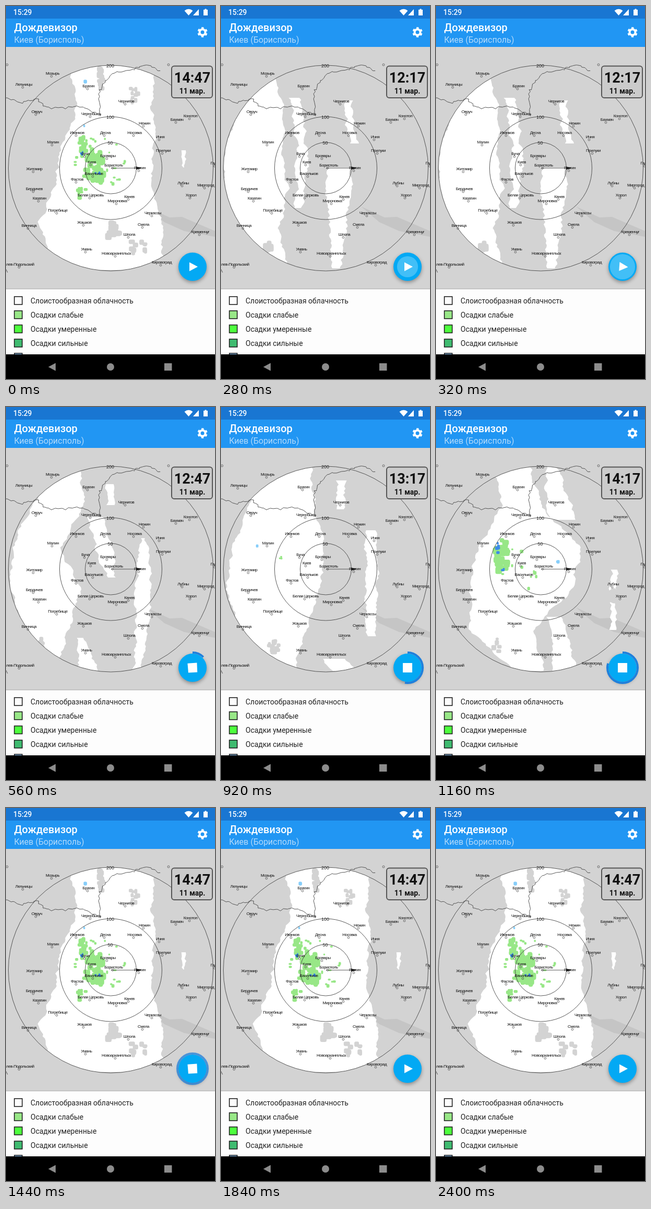
Write an HTML page with a canvas that moves like this. It is 400 px wide and 711 px high and loops after 2800 ms.

```html
<!DOCTYPE html>
<html lang="ru">
<head>
<meta charset="utf-8">
<style>
html, body { margin: 0; width: 100%; height: 100%; overflow: hidden; background: #000; }
canvas { display: block; }
</style>
</head>
<body>
<canvas id="stage" width="400" height="711"></canvas>
<script>
const ctx = document.getElementById('stage').getContext('2d');
const TAU = Math.PI * 2, LOOP = 2800;
const CX = 200.5, CY = 309, RADIUS = 196;
const FIRST_SCAN = 260, SCAN_TIME = 224;
const LAND = '#d3d3d3', RAIN = '#98e787', STORM = '#3c8be8', HAIL = '#87cefa';

const CITIES = `Мозырь 89 128|Лельчицы 34 149|Брагин 158 152|Чернигов 230 181|Овруч 59 201
Чернобыль 163 205|Нежин 265 223|Бахмач 327 216|Конотоп 353 209|Иванков 136 241|Десна 190 241
Носовка 246 241|Ичня 295 249|Малин 90 259|Буча 152 281|Бровары 195 285|Прилуки 301 275
Киев 164 297|Борисполь 206 303|Яготин 256 308|Житомир 54 310|Васильков 168 319|Фастов 136 330
Бердичев 54 348|Казатин 64 366|Белая_Церковь 162 360|Канев 236 363|Мироновка 213 371|Лубны 339 337
Миргород 382 341|Хорол 354 360|Погребище 99 389|Черкассы 281 394|Винница 44 418|Жашков 150 412
Смела 263 416|Шпола 236 435|Кременчуг 372 430|Умань 154 463|Новоархангельск 211 471
Кировоград 298 488|Гадяч 401 299|лев-Подольский 27 492`.split(/[|\n]/).map(row => row.split(' '));

// Cloud bands: top, bottom, then left and right edge at evenly spaced heights.
// Spots: colour, centre, spread, count, largest size.
const SCANS = [
  { bands: [
      [112, 503, [62, 38, 8, 6, 32, 104], [92, 122, 120, 128, 112, 132]],
      [175, 385, [132, 146, 145], [150, 168, 156]],
      [308, 500, [205, 204, 212], [250, 241, 228]],
      [180, 262, [239, 243], [250, 262]]],
    spots: [[LAND, 88, 470, 8, 26, 14, 14]] },
  { bands: [
      [112, 503, [115, 46, 12, 8, 36, 86], [140, 148, 105, 145, 118, 98]],
      [210, 325, [155, 170, 195], [187, 203, 209]],
      [440, 503, [135, 138], [148, 176]],
      [250, 500, [258, 248, 245], [268, 280, 258]],
      [147, 187, [193, 195], [206, 212]]],
    spots: [[LAND, 68, 465, 6, 24, 12, 12]] },
  { bands: [
      [112, 503, [85, 52, 20, 8, 36, 115], [172, 178, 200, 190, 166, 142]],
      [235, 437, [275, 277, 280], [296, 299, 296]],
      [140, 195, [222, 224], [240, 232]],
      [480, 503, [198, 212], [238, 258]]],
    spots: [[LAND, 102, 453, 10, 16, 14, 12], [HAIL, 70, 266, 2, 2, 2, 6], [RAIN, 114, 288, 2, 4, 4, 4]] },
  null,
  { bands: [
      [112, 503, [112, 125, 78, 66, 64, 150], [180, 200, 280, 260, 185, 203]],
      [112, 215, [210, 215], [230, 268]],
      [400, 503, [214, 226], [240, 270]],
      [310, 425, [335, 334], [348, 342]]],
    spots: [[LAND, 340, 360, 5, 12, 16, 14], [LAND, 115, 455, 10, 14, 6, 10],
      [RAIN, 126, 285, 13, 32, 34, 14], [RAIN, 165, 305, 42, 45, 12, 7],
      [STORM, 118, 267, 2, 12, 5, 7], [STORM, 130, 310, 4, 3, 3, 6], [HAIL, 234, 295, 1, 1, 3, 7]] },
  { bands: [
      [112, 503, [120, 138, 106, 92, 62, 105], [284, 278, 285, 279, 300, 303]],
      [275, 308, [337, 338], [344, 346]]],
    spots: [[LAND, 181, 136, 4, 24, 18, 12], [LAND, 246, 165, 8, 24, 10, 10],
      [LAND, 205, 430, 11, 20, 16, 14], [LAND, 250, 460, 22, 12, 12, 12],
      [RAIN, 148, 268, 6, 22, 16, 12], [RAIN, 172, 306, 20, 32, 34, 16],
      [RAIN, 146, 356, 10, 14, 9, 9], [RAIN, 185, 295, 58, 54, 26, 7],
      [STORM, 145, 281, 2, 4, 3, 5], [STORM, 175, 319, 7, 2, 4, 5],
      [HAIL, 152, 144, 1, 1, 3, 8], [HAIL, 150, 228, 1, 1, 2, 6]] }
];
// The 13:47 picture is the following one, slightly further west.
SCANS[3] = { ...SCANS[4], shift: -14 };

function seeded(seed) {
  return () => (seed = seed * 16807 % 2147483647) / 2147483647;
}
function along(values, u) {
  const pos = u * (values.length - 1), i = Math.min(values.length - 2, Math.floor(pos));
  return values[i] + (values[i + 1] - values[i]) * (pos - i);
}

// Adds a band whose edges wander like the ragged outline of radar echoes.
function addBand(path, [top, bottom, left, right], random) {
  const steps = Math.round((bottom - top) / 4);
  const edge = values => {
    let drift = 0;
    return Array.from({ length: steps + 1 }, (_, i) => {
      drift = drift * .7 + (random() - .5) * 6;
      return [along(values, i / steps) + drift, top + (bottom - top) * i / steps];
    });
  };
  const outline = [...edge(left), ...edge(right).reverse()];
  outline.forEach(([x, y], i) => i ? path.lineTo(x, y) : path.moveTo(x, y));
  path.closePath();
}
function spotPath([, x, y, rx, ry, count, size], random) {
  const path = new Path2D();
  while (count--) {
    const angle = random() * TAU, reach = Math.sqrt(random());
    const w = size * (.5 + random() / 2), h = size * (.5 + random() / 2);
    path.roundRect(x + rx * reach * Math.cos(angle) - w / 2, y + ry * reach * Math.sin(angle) - h / 2, w, h, size / 4);
  }
  return path;
}
SCANS.forEach((scan, i) => {
  const random = seeded(9973 * (i + 7)), clouds = new Path2D();
  scan.bands.forEach(band => addBand(clouds, band, random));
  scan.layers = [['#fff', clouds], ...scan.spots.map(spot => [spot[0], spotPath(spot, random)])];
});

// A border through a few key points, roughened between them.
function borderPath(points, random) {
  const path = new Path2D();
  path.moveTo(...points[0]);
  const xs = points.map(p => p[0]), ys = points.map(p => p[1]), steps = points.length * 6;
  for (let i = 1; i <= steps; i++) {
    path.lineTo(along(xs, i / steps) + (random() - .5) * 4, along(ys, i / steps) + (random() - .5) * 4);
  }
  return path;
}
const BORDERS = [
  [[0, 175], [30, 184], [59, 176], [77, 194], [110, 195], [146, 191], [181, 210]],
  [[181, 210], [178, 166], [185, 150], [206, 127], [243, 122], [268, 111], [295, 124]]
].map((points, i) => borderPath(points, seeded(5003 * (i + 3))));

function rect(x, y, w, h, fill) { ctx.fillStyle = fill; ctx.fillRect(x, y, w, h); }
function circle(x, y, r) { ctx.beginPath(); ctx.arc(x, y, r, 0, TAU); }
function text(str, x, y, font, fill, align = 'left') {
  ctx.font = font; ctx.fillStyle = fill; ctx.textAlign = align;
  ctx.fillText(str, x, y);
}
function fillPath(d, fill) { ctx.fillStyle = fill; ctx.fill(new Path2D(d)); }
const ramp = (t, a, b) => Math.min(1, Math.max(0, (t - a) / (b - a)));
const smooth = u => u * u * (3 - 2 * u);

function drawMap(index) {
  const scan = SCANS[index];
  rect(0, 78, 400, 463, LAND);
  fillPath('M268 382L313 403L337 402L400 429V440L341 429L303 412Z', '#c5c5c5');
  ctx.save();
  circle(CX, CY, RADIUS); ctx.clip();
  ctx.translate(scan.shift || 0, 0);
  for (const [fill, path] of scan.layers) { ctx.fillStyle = fill; ctx.fill(path); }
  ctx.restore();

  ctx.strokeStyle = '#444'; ctx.lineWidth = .9;
  BORDERS.forEach(path => ctx.stroke(path));
  ctx.stroke(new Path2D('M0 502L3 508M201 309H258'));
  for (const r of [RADIUS / 4, RADIUS / 2, RADIUS]) { circle(CX, CY, r); ctx.stroke(); }
  fillPath('M260 309L249 306V312Z', '#222');
  ctx.lineWidth = .7;
  for (const x of [2, 311]) { circle(x, 112, 2); ctx.stroke(); }
  ctx.letterSpacing = '-0.5px';
  for (const [name, x, y] of CITIES) {
    circle(x - 2, +y + 6, 1.9); ctx.stroke();
    text(name.replace('_', ' '), +x, +y + 3, '8px "Liberation Sans", Arial, sans-serif', '#111', 'center');
  }
  ctx.letterSpacing = '0px';
  for (const km of [50, 100, 200]) {
    text(km, 199.5, CY + 4 - km * RADIUS / 200, '9px "Liberation Sans", Arial, sans-serif', '#222', 'center');
  }

  ctx.beginPath(); ctx.roundRect(317, 114.5, 78, 60.5, 5);
  ctx.fillStyle = '#cbcbcb'; ctx.fill();
  ctx.strokeStyle = '#555'; ctx.lineWidth = 2; ctx.stroke();
  const minutes = 12 * 60 + 17 + index * 30;
  text(`${Math.floor(minutes / 60)}:${minutes % 60}`, 356.5, 146, 'bold 27px Roboto, sans-serif', '#111', 'center');
  text('11 мар.', 356.5, 167, 'bold 14px Roboto, sans-serif', '#111', 'center');
}

function drawHeader() {
  rect(0, 0, 400, 24, '#1976d2');
  rect(0, 24, 400, 54, '#2196f3');
  text('15:29', 14, 17, '500 14px Roboto, sans-serif', '#fff');
  text('Дождевизор', 15.5, 48, '500 20px Roboto, sans-serif', '#fff');
  text('Киев (Борисполь)', 15.5, 70, '16px Roboto, sans-serif', '#b3dafb');
  fillPath('M341.5 9Q349.5 2.5 357.5 9L349.5 18Z', '#fff');
  fillPath('M369 6V18H358Z', '#fff');
  fillPath('M378 7H380.5V5.5H383.5V7H386V18H378Z', '#fff');
  ctx.strokeStyle = '#fff';
  circle(376, 50, 5.5); ctx.lineWidth = 4; ctx.stroke();
  // Six gear teeth, one of them pointing up.
  const tooth = TAU * 8 / 12;
  ctx.setLineDash([tooth, tooth]); ctx.lineDashOffset = -tooth / 2;
  circle(376, 50, 8); ctx.lineWidth = 3.4; ctx.stroke();
  ctx.setLineDash([]);
}

function drawLegend() {
  rect(0, 538.5, 400, 2, '#bdbdbd');
  rect(0, 540, 400, 124, '#fdfdfd');
  [['#fdfdfd', 'Слоистообразная облачность'], [RAIN, 'Осадки слабые'], ['#4dff3d', 'Осадки умеренные'],
   ['#3fbb70', 'Осадки сильные'], ['#87bdf0', '']].forEach(([fill, label], i) => {
    const y = 554 + i * 27;
    rect(16, y, 15, 15, fill);
    ctx.strokeStyle = '#222'; ctx.lineWidth = 1.6; ctx.strokeRect(16, y, 15, 15);
    text(label, 47, y + 13, '14px Roboto, sans-serif', '#222');
  });
  rect(0, 664, 400, 47, '#000');
  fillPath('M81 688L95 680.5V695.5Z', '#8c8c8c');
  circle(200, 688, 7); ctx.fill();
  rect(303, 681, 14.5, 14, '#8c8c8c');
}

function drawButton(t) {
  ctx.save();
  ctx.translate(357, 497);
  ctx.save();
  ctx.shadowColor = 'rgba(0,0,0,.35)'; ctx.shadowBlur = 7; ctx.shadowOffsetY = 3;
  circle(0, 0, 27); ctx.fillStyle = '#03a9f4'; ctx.fill();
  ctx.restore();

  // The ring gains a quarter turn with each new scan.
  const sweep = TAU * ramp(t, 448, 448 + 4 * SCAN_TIME);
  ctx.globalAlpha = 1 - ramp(t, 1400, 1560);
  ctx.beginPath(); ctx.arc(0, 0, 29, -TAU / 4, sweep - TAU / 4);
  ctx.strokeStyle = '#1f80dc'; ctx.lineWidth = 4;
  if (sweep) ctx.stroke();

  ctx.globalAlpha = .25 * ramp(t, 80, 160) * (1 - ramp(t, 400, 560));
  circle(0, 0, 26 * ramp(t, 80, 340)); ctx.fillStyle = '#fff'; ctx.fill();

  ctx.globalAlpha = 1;
  const stop = smooth(ramp(t, 280, 600)) - smooth(ramp(t, 1400, 1740));
  const play = [[-6, -8.5], [10, 0], [10, 0], [-6, 8.5]];
  const square = [[-9, -9], [9, -9], [9, 9], [-9, 9]];
  ctx.rotate(stop * TAU / 4);
  ctx.beginPath();
  play.forEach(([x, y], i) => ctx.lineTo(x + (square[i][0] - x) * stop, y + (square[i][1] - y) * stop));
  ctx.fillStyle = '#fff'; ctx.fill();
  ctx.restore();
}

function draw() {
  const t = performance.now() % LOOP;
  const step = Math.floor((t - FIRST_SCAN) / SCAN_TIME);
  drawMap(step < 0 ? 5 : Math.min(step, 5));
  drawHeader();
  drawLegend();
  drawButton(t);
  requestAnimationFrame(draw);
}
draw();
</script>
</body>
</html>
```
